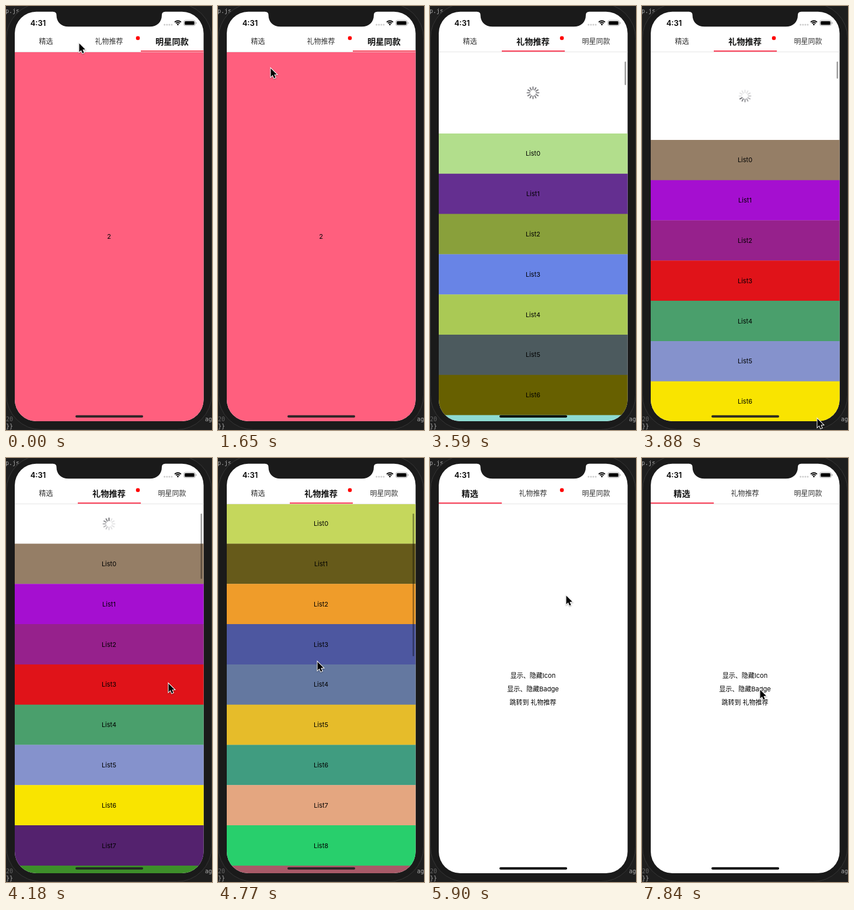
An HTML page with a canvas for the animation above (8 s loop, 353x725 px).

```html
<!DOCTYPE html>
<html lang="zh-CN">
<head>
<meta charset="utf-8">
<title>Tabs with pull to refresh</title>
<style>
html, body { margin: 0; width: 100%; height: 100%; overflow: hidden; background: #1b1b1b; }
canvas { display: block; width: 353px; height: 725px; }
</style>
</head>
<body>
<canvas id="stage"></canvas>
<script>
const canvas = document.getElementById('stage');
const ctx = canvas.getContext('2d');
const ratio = window.devicePixelRatio || 1;
canvas.width = 353 * ratio;
canvas.height = 725 * ratio;

const LOOP = 8000, LEFT = 15, TOP = 79, WIDTH = 324, ROW = 68.8;
const UI = 'Inter, "Noto Sans CJK SC", "Noto Sans CJK", sans-serif';
const MONO = '"DejaVu Sans Mono", monospace';
const TABS = ['精选', '礼物推荐', '明星同款'];
const PALETTES = [
  '#b2de8c #642f90 #89a03b #6884e6 #aac955 #4c5a5e #676000 #8edbd2 #a88cf2 #4a62d8',
  '#957e66 #a50fd0 #96218c #e01319 #4a9f6c #8592cc #f9e400 #54226e #3d8f2a #b06a40',
  '#c5d75c #665a1a #ef9c2a #4d57a0 #6478a0 #e6bc2a #409c80 #e4a680 #28cf6c #a85a68'
].map(list => list.split(' '));

// Bursts of motion: start, end, number of steps
const BURSTS = [
  [150, 600, 4], [1200, 1350, 2], [1650, 1940, 3], [2390, 2990, 5], [3440, 4480, 8],
  [4630, 4920, 3], [5210, 5900, 6], [7100, 7540, 4]
];
// Tracks: time, value...
const PAGE = [[2240, 2], [2390, 1.55], [2540, 1.12], [2690, 1.01], [2840, 1],
  [5060, 1], [5210, .85], [5348, .4], [5486, .1], [5762, 0]];
const LINE = [[2690, 2], [2840, 1.3], [2990, 1], [5624, 1], [5762, .3], [5900, 0]];
const PULL = [[3290, 0], [3440, 75], [3589, 139], [3737, 165], [3885, 150], [4034, 90],
  [4183, 67.3], [4480, 67.3], [4630, 28], [4775, -1.5]];
const POINTER = [[0, 125, 63.5], [300, 89, 64], [600, 151, 65], [1050, 151, 65], [1350, 95, 66],
  [1500, 95, 66], [1795, 85, 145], [1940, 77, 187], [3885, 300, 706], [4034, 298, 545],
  [4183, 278, 385], [4480, 205, 352], [4775, 170, 348], [4920, 162, 348],
  [5762, 240, 262], [5900, 233, 235], [6950, 233, 235], [7247, 217, 320], [7540, 202, 396]];

function snap(time) {
  let result = 0;
  for (const [start, end, steps] of BURSTS) {
    if (time < start) break;
    const gap = (end - start) / (steps - 1);
    result = Math.min(end, start + gap * Math.floor((time - start) / gap + .05));
  }
  return result;
}

function track(keys, time) {
  const next = keys.findIndex(key => key[0] > time);
  if (next === 0) return keys[0].slice(1);
  if (next < 0) return keys[keys.length - 1].slice(1);
  const a = keys[next - 1], b = keys[next];
  const k = (time - a[0]) / (b[0] - a[0]);
  return a.slice(1).map((v, i) => v + (b[i + 1] - v) * k);
}

function rect(x, y, w, h, color, radius = 0) {
  ctx.fillStyle = color;
  ctx.beginPath();
  ctx.roundRect(x, y, w, h, radius);
  ctx.fill();
}

function dot(x, y, r, color) {
  rect(x - r, y - r, r * 2, r * 2, color, r);
}

function text(string, x, y, size = 11, { weight = 400, color = '#000', align = 'center', font = UI } = {}) {
  ctx.font = `${weight} ${size}px ${font}`;
  ctx.textAlign = align;
  ctx.fillStyle = color;
  ctx.fillText(string, x, y + size * .37);
}

function drawBezel() {
  rect(0, 0, 353, 725, '#1e1e1e');
  const code = { color: '#a8a8a8', align: 'left', font: MONO };
  text('p.js', -1, 8, 10, code);
  text('20', 0, 706, 10, { ...code, color: '#666' });
  text('}}', 0, 718, 10, code);
  text('ag', 341, 706, 10, code);
  rect(.5, -4.5, 352, 729, '#1a1a1a', 60);
  ctx.strokeStyle = '#363636';
  ctx.lineWidth = 1;
  ctx.stroke();
}

function drawSpinner(y, time, spinning) {
  const head = Math.floor((time - 4180) / 83);
  ctx.lineWidth = 1.9;
  ctx.lineCap = 'round';
  for (let i = 0; i < 12; i++) {
    const age = ((head - i) % 12 + 12) % 12;
    const angle = i * Math.PI / 6 - Math.PI / 2;
    const c = Math.cos(angle), s = Math.sin(angle);
    ctx.strokeStyle = `rgba(60,60,67,${spinning ? Math.max(.15, .75 - age * .09) : .68})`;
    ctx.beginPath();
    ctx.moveTo(176.5 + c * 5.7, y + s * 5.7);
    ctx.lineTo(176.5 + c * 10, y + s * 10);
    ctx.stroke();
  }
  ctx.lineCap = 'butt';
}

function drawList(time) {
  const [pull] = track(PULL, time);
  const closing = time > 4600;
  const colors = PALETTES[closing ? 2 : time > 3880 ? 1 : 0];
  if (pull > 20) drawSpinner(TOP + pull / 2, time, time > 3880);
  colors.forEach((color, i) => {
    const y = TOP + .2 + pull + i * ROW;
    rect(LEFT, y, WIDTH, ROW + .3, color);
    text('List' + i, 176.5, y + ROW / 2);
  });
  if (time >= 3440 && time < 4900) {
    const length = closing ? 244 - (pull + 1.5) * 1.92 : 179 - pull;
    rect(333.5, 95, 2.6, Math.max(length, 8), 'rgba(0,0,0,.38)', 1.3);
  }
}

const drawPages = [
  () => {
    text('显示、隐藏Icon', 176.5, 371.5);
    text('显示、隐藏Badge', 176.5, 394.5);
    text('跳转到 礼物推荐', 176.5, 417.5);
  },
  drawList,
  () => {
    rect(LEFT, TOP, WIDTH, 640, '#ff5f7e');
    text('2', 176.5, 394);
  }
];

function drawStatusBar() {
  text('4:31', 55, 29, 13, { weight: 600 });
  for (let i = 0; i < 4; i++) dot(271.7 + i * 4.1, 32, 1.5, '#ccc');
  ctx.strokeStyle = ctx.fillStyle = '#000';
  ctx.lineWidth = 1.9;
  for (const r of [7.7, 4.7]) {
    ctx.beginPath();
    ctx.arc(294.5, 33, r, -Math.PI * .75, -Math.PI * .25);
    ctx.stroke();
  }
  ctx.beginPath();
  ctx.moveTo(294.5, 33.4);
  ctx.arc(294.5, 33, 2.5, -Math.PI * .75, -Math.PI * .25);
  ctx.fill();
  rect(304.7, 24.6, 19.6, 9, '#fff', 2.6);
  ctx.strokeStyle = '#999';
  ctx.lineWidth = .8;
  ctx.stroke();
  rect(306.1, 26, 16.8, 6.2, '#000', 1.5);
  rect(325.2, 27.6, 1.1, 3, '#999', .5);
}

function drawNotch() {
  ctx.fillStyle = '#1a1a1a';
  ctx.beginPath();
  ctx.moveTo(81, 9);
  ctx.lineTo(81, 10);
  ctx.quadraticCurveTo(86.5, 10, 86.5, 15.5);
  ctx.bezierCurveTo(86.5, 28, 95, 35.3, 107, 35.3);
  ctx.lineTo(246.5, 35.3);
  ctx.bezierCurveTo(258.5, 35.3, 267, 28, 267, 15.5);
  ctx.quadraticCurveTo(267, 10, 272.5, 10);
  ctx.lineTo(272.5, 9);
  ctx.fill();
}

function drawTabs(time, badge) {
  const [line] = track(LINE, time);
  TABS.forEach((name, i) => {
    const active = i === Math.round(line);
    text(name, 68.5 + i * 108, 61, active ? 14.2 : 12,
      { weight: active ? 700 : 400, color: active ? '#111' : '#333' });
  });
  rect(LEFT, 78.2, WIDTH, .8, '#dedede');
  rect(LEFT + line * 108, 75.9, 108, 2.4, '#f9485f');
  if (badge) dot(226, 54.9, 3.3, '#f00');
}

function drawPointer(time) {
  if (time >= 2390 && time < 3880 || time >= 5210 && time < 5750) return;
  const [x, y] = track(POINTER, time);
  const arrow = new Path2D('M0 0V14.5L3.3 11.4 5.6 16.8 8.1 15.7 5.8 10.5 10.3 10.3Z');
  ctx.save();
  ctx.translate(x + .5, y + .5);
  ctx.shadowColor = 'rgba(0,0,0,.35)';
  ctx.shadowBlur = 2 * ratio;
  ctx.shadowOffsetY = ratio;
  ctx.strokeStyle = '#fff';
  ctx.lineWidth = 2;
  ctx.stroke(arrow);
  ctx.shadowColor = 'transparent';
  ctx.fillStyle = '#000';
  ctx.fill(arrow);
  ctx.restore();
}

function draw(now) {
  const clock = now % LOOP;
  const time = snap(clock);
  const [page] = track(PAGE, time);
  ctx.setTransform(ratio, 0, 0, ratio, 0, 0);
  drawBezel();

  ctx.save();
  rect(LEFT, 9.7, 323.6, 700.3, '#fff', 37);
  ctx.clip();
  ctx.save();
  ctx.beginPath();
  ctx.rect(LEFT, TOP, WIDTH, 640);
  ctx.clip();
  drawPages.forEach((drawPage, i) => {
    if (Math.abs(i - page) >= 1) return;
    ctx.save();
    ctx.translate((i - page) * WIDTH, 0);
    drawPage(time);
    ctx.restore();
  });
  ctx.restore();
  drawStatusBar();
  drawTabs(time, clock < 7840);
  const solid = time > 2900 && time < 3880 || time > 5700;
  rect(119, 699.8, 116, 3.9, solid ? '#000' : 'rgba(34,34,34,.95)', 2);
  ctx.restore();

  drawNotch();
  drawPointer(time);
  requestAnimationFrame(() => draw(performance.now()));
}
draw(0);
</script>
</body>
</html>
```
